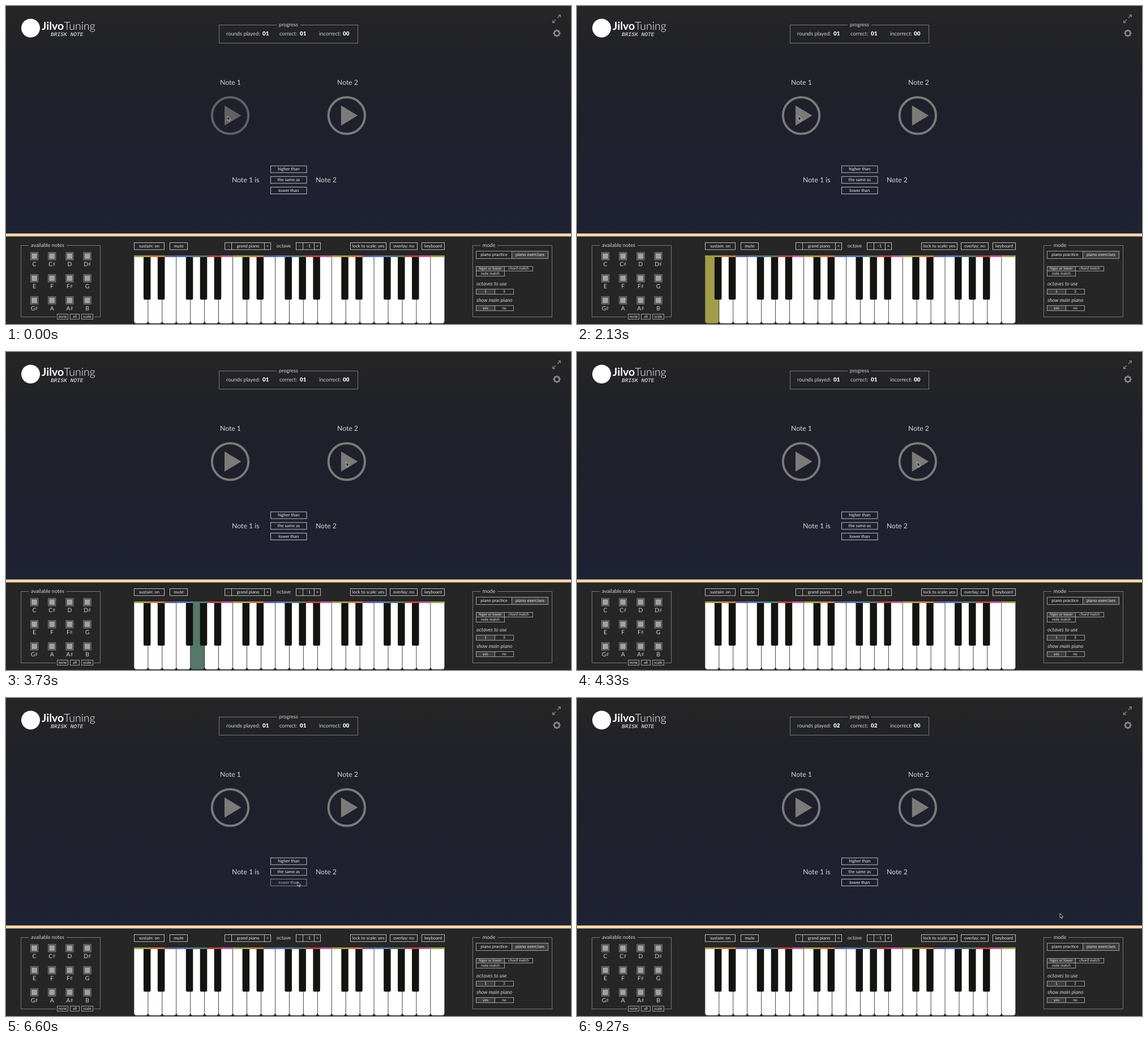
Animation of 998x561 px, one loop 9330 ms. Source, as an HTML page with a canvas:

```html
<!DOCTYPE html>
<html lang="en">
<head>
<meta charset="utf-8">
<title>Ear training</title>
<style>
  html, body { margin: 0; width: 100%; height: 100%; overflow: hidden; background: #262626; }
  canvas { display: block; }
</style>
</head>
<body>
<canvas id="stage" width="998" height="561"></canvas>
<script>
const ctx = document.getElementById('stage').getContext('2d');
ctx.textRendering = 'geometricPrecision';
const LOOP = 9330, STEP = 200 / 3;
const SANS = 'Lato, "DejaVu Sans", sans-serif';
const PANEL = '#262626', FIELD = '#787878', GREY = '#7c7b7a';

const NOTES = ['C', 'C♯', 'D', 'D♯', 'E', 'F', 'F♯', 'G', 'G♯', 'A', 'A♯', 'B'];
const OLIVE = '#a19d4b', ORANGE = '#c87d45', PURPLE = '#6b5e92', BLUE = '#5a76a8',
      TEAL = '#56786b', RED = '#b9443f', PINK = '#bb5f9f';
const WHITE_COLORS = [OLIVE, ORANGE, PURPLE, BLUE, TEAL, RED, PINK];
const KEY_X = 226, KEY_W = 24.95, KEY_COUNT = 22;

// Time spans in ms; keys are [white key, on, off]
const KEY_SPANS = [[2, 130, 330], [1, 470, 800], [0, 1070, 1470], [0, 2000, 2200],
                   [4, 3730, 3930], [4, 4130, 4330]];
const PRESS_1 = [[0, 70], [1470, 1670]];
const PRESS_2 = [[2670, 2870], [3130, 3270]];
const PRESS_LOWER = [[6530, 6670]];
const PRESS_NEXT = [[8730, 8870]];
const ANSWER = [[6670, 8870]];

// Pointer tip: [time, x, y]
const POINTER = [
  [0, 391, 194], [2200, 391, 194], [2330, 480, 200], [2470, 617, 198], [2530, 601, 194],
  [4470, 601, 194], [4670, 560, 290], [4800, 525, 317], [4930, 505, 305],
  [5130, 505, 305], [5330, 496, 294], [5470, 496, 294], [5730, 432.5, 269],
  [5870, 408, 225], [5930, 411, 207], [6130, 470, 270], [6330, 515, 324],
  [6670, 515, 324], [6930, 558, 298], [7330, 558, 298], [7870, 520.5, 366.5],
  [8070, 520.5, 366.5], [8200, 516, 368], [8930, 516, 368], [9270, 853, 380], [LOOP, 853, 380]
];

const within = (now, spans) => spans.some(([from, to]) => now >= from && now < to);

function pointerAt(now) {
  const i = POINTER.findIndex(p => p[0] > now);
  const [t0, x0, y0] = POINTER[i - 1], [t1, x1, y1] = POINTER[i];
  const f = (now - t0) / (t1 - t0);
  return [x0 + (x1 - x0) * f, y0 + (y1 - y0) * f];
}

function text(str, x, y, size, { align = 'center', style = '', color = '#d6d6d6', family = SANS } = {}) {
  ctx.font = `${style} ${size}px ${family}`;
  ctx.textAlign = align;
  ctx.fillStyle = color;
  ctx.fillText(str, x, y + size * 0.32);
  return ctx.measureText(str).width;
}

function rect(x, y, w, h, color) {
  ctx.fillStyle = color;
  ctx.fillRect(x, y, w, h);
}

function outline(x, y, w, h, color) {
  ctx.strokeStyle = color;
  ctx.lineWidth = 1;
  ctx.strokeRect(x + 0.5, y + 0.5, w - 1, h - 1);
}

function shape(points, color) {
  ctx.beginPath();
  points.forEach(([x, y]) => ctx.lineTo(x, y));
  ctx.closePath();
  ctx.fillStyle = color;
  ctx.fill();
}

function disc(x, y, r, fill, stroke, width) {
  ctx.beginPath();
  ctx.arc(x, y, r, 0, Math.PI * 2);
  if (fill) { ctx.fillStyle = fill; ctx.fill(); }
  if (stroke) { ctx.strokeStyle = stroke; ctx.lineWidth = width; ctx.stroke(); }
}

function button(label, x, y, w, h, { size = 7.7, fill, border = '#bdbdbd', pressed = false } = {}) {
  ctx.globalAlpha = pressed ? 0.65 : 1;
  if (fill) rect(x, y, w, h, fill);
  outline(x, y, w, h, border);
  text(label, x + w / 2, y + h / 2 - 0.3, size, { color: '#ececec' });
  ctx.globalAlpha = 1;
}

function fieldset(label, x, y, w, h, gapX, gapW, back) {
  outline(x, y, w, h, FIELD);
  rect(gapX, y - 1, gapW, 3, back);
  text(label, gapX + gapW / 2, y, 9.1);
}

function drawBackdrop() {
  const sky = ctx.createLinearGradient(0, 0, 0, 402);
  sky.addColorStop(0, '#262626');
  sky.addColorStop(0.22, '#212228');
  sky.addColorStop(0.5, '#1f202b');
  sky.addColorStop(1, '#1f2234');
  rect(0, 0, 998, 402, sky);
  rect(0, 402, 998, 159, PANEL);
  rect(0, 401.3, 998, 5.2, '#f7daaa');
}

function drawHeader(score) {
  disc(43.5, 39, 16.5, '#ffffff');
  const w = text('Jilvo', 63, 36, 19.5, { align: 'left', style: 'bold', color: '#fff' });
  text('Tuning', 63 + w, 36, 19.5, { align: 'left', style: '300', color: '#fff' });
  text('BRISK NOTE', 79, 50, 9.6,
    { align: 'left', style: 'italic', color: '#fff', family: '"Liberation Mono", monospace' });

  fieldset('progress', 376, 33, 246, 33, 478, 42, '#252526');
  [['rounds played:', 389, score, 453], ['correct:', 483, score, 519], ['incorrect:', 553, '00', 595]]
    .forEach(([label, x, value, valueX]) => {
      text(label, x, 49, 9.3, { align: 'left' });
      text(value, valueX, 49, 9.8, { align: 'left', style: '900', color: '#fff' });
    });

  // Expand arrows
  ctx.strokeStyle = '#858585';
  ctx.lineWidth = 1.3;
  for (const s of [1, -1]) {
    const at = (dx, dy) => [972.5 + s * dx, 22.5 + s * dy];
    ctx.beginPath();
    ctx.moveTo(...at(1.5, -1.5));
    ctx.lineTo(...at(6.5, -6.5));
    ctx.moveTo(...at(2.5, -6.8));
    ctx.lineTo(...at(6.8, -6.8));
    ctx.lineTo(...at(6.8, -2.5));
    ctx.stroke();
  }

  // Settings gear
  disc(973, 48, 4.4, null, '#858585', 2.6);
  for (let i = 0; i < 8; i++) {
    ctx.save();
    ctx.translate(973, 48);
    ctx.rotate(i * Math.PI / 4);
    rect(-1.3, -6.6, 2.6, 1.6, '#858585');
    ctx.restore();
  }
}

function drawPlay(label, labelX, x, pressed) {
  text(label, labelX, 135.5, 12.2);
  ctx.globalAlpha = pressed ? 0.72 : 1;
  disc(x, 193.3, 32.2, null, GREY, 4);
  shape([[x - 10, 175.5], [x + 19.5, 193.3], [x - 10, 211]], GREY);
  ctx.globalAlpha = 1;
}

function drawQuestion(now) {
  text('Note 1 is', 399, 307, 12.3, { align: 'left' });
  text('Note 2', 547, 307, 12.2, { align: 'left' });
  button('higher than', 467, 281.5, 64.5, 13);
  button('the same as', 467, 300.3, 64.5, 13);
  button('lower than', 467, 319, 64.5, 13, { pressed: within(now, PRESS_LOWER) });
}

function drawAnswer(now) {
  disc(396, 257.5, 9, null, OLIVE, 2.2);
  text('C♯', 396, 257.5, 9.5);
  disc(601.8, 257.5, 10.3, TEAL);
  text('G', 601.8, 257.5, 11);
  text('C♯ is 6 semitones lower than G', 499, 313, 11.5);
  text('Correct Answer', 499, 332.5, 11.3);
  button('next round', 467, 362, 64.5, 13, { pressed: within(now, PRESS_NEXT) });
}

function drawNotePicker() {
  fieldset('available notes', 26, 422, 141, 127, 40, 67, PANEL);
  NOTES.forEach((name, i) => {
    const x = 50 + (i % 4) * 31.2, y = 441.3 + Math.floor(i / 4) * 39;
    outline(x - 7, y - 7, 14, 14, '#8f8f8f');
    rect(x - 5, y - 5, 10, 10, '#a2a2a2');
    text(name, x, y + 14, 10.4);
  });
  rect(88, 543, 67, 10, PANEL);
  [['none', 90, 20], ['all', 113, 17], ['scale', 133, 21]]
    .forEach(([label, x, w]) => button(label, x, 543, w, 10, { size: 6.7, border: '#a0a0a0' }));
}

function drawToolbar() {
  [['sustain: on', 226, 54], ['mute', 289, 32], ['-', 386, 13], ['grand piano', 398, 59],
   ['+', 456, 12], ['-', 512, 13], ['-1', 524, 21], ['+', 544, 12],
   ['lock to scale: yes', 608, 64], ['overlay: no', 678, 49], ['keyboard', 734, 41]]
    .forEach(([label, x, w]) => button(label, x, 417, w, 13.3));
  text('octave', 490.5, 423, 8.7);
}

function drawMode() {
  fieldset('mode', 824, 422, 141, 127, 838, 30, PANEL);
  const dark = '#3d3d3d', border = '#a0a0a0';
  button('piano practice', 830, 432, 64, 14, { border });
  button('piano exercises', 893, 432, 65, 14, { fill: dark, border });
  const small = { size: 6.7, border }, chosen = { ...small, fill: dark };
  button('higer or lower', 830, 459, 51, 9, chosen);
  button('chord match', 880, 459, 51, 9, small);
  button('note match', 830, 467, 51, 10, small);
  text('octaves to use', 831, 490.5, 9.1, { align: 'left', style: 'italic' });
  button('1', 830, 499, 34, 10, chosen);
  button('3', 863, 499, 34, 10, small);
  text('show main piano', 831, 519, 9.1, { align: 'left', style: 'italic' });
  button('yes', 830, 528, 34, 10, chosen);
  button('no', 863, 528, 34, 10, small);
}

function drawPiano(now) {
  rect(KEY_X, 440, KEY_W * KEY_COUNT, 120, '#141414');
  for (let i = 0; i < KEY_COUNT; i++) {
    const x = KEY_X + i * KEY_W, color = WHITE_COLORS[i % 7];
    const lit = KEY_SPANS.some(([key, on, off]) => key === i && now >= on && now < off);
    ctx.beginPath();
    ctx.roundRect(x + 0.3, 440, KEY_W - 0.8, 119.7, [0, 0, 4, 4]);
    ctx.fillStyle = lit ? color : '#ffffff';
    ctx.fill();
    rect(x, 440, KEY_W, 3, color);
  }
  for (let i = 1; i < KEY_COUNT; i++) {
    if (i % 7 === 0 || i % 7 === 3) continue;
    const x = KEY_X + i * KEY_W - 8;
    ctx.beginPath();
    ctx.roundRect(x, 442, 12.5, 76, [0, 0, 2, 2]);
    ctx.fillStyle = '#131312';
    ctx.fill();
    rect(x, 440, 12.5, 3, WHITE_COLORS[(i - 1) % 7]);
  }
}

function drawPointer([x, y]) {
  const tip = [[0, 0], [0, 8.2], [1.9, 6.5], [3.2, 9.4], [4.5, 8.8], [3.2, 6], [5.7, 5.9]];
  shape(tip.map(([dx, dy]) => [x + dx, y + dy]), '#141414');
  ctx.strokeStyle = '#d8d8d8';
  ctx.lineWidth = 0.8;
  ctx.stroke();
}

function draw(now) {
  drawBackdrop();
  drawHeader(now < ANSWER[0][0] ? '01' : '02');
  drawPlay('Note 1', 396.5, 396, within(now, PRESS_1));
  drawPlay('Note 2', 603.5, 601.8, within(now, PRESS_2));
  (within(now, ANSWER) ? drawAnswer : drawQuestion)(now);
  drawNotePicker();
  drawToolbar();
  drawMode();
  drawPiano(now);
  drawPointer(pointerAt(now));
}

// Time advances in 15 steps per second
function tick() {
  const step = Math.floor((performance.now() % LOOP + 4) / STEP);
  draw(Math.min(Math.round(step * STEP / 10) * 10, LOOP - 10));
  requestAnimationFrame(tick);
}
tick();
</script>
</body>
</html>
```
